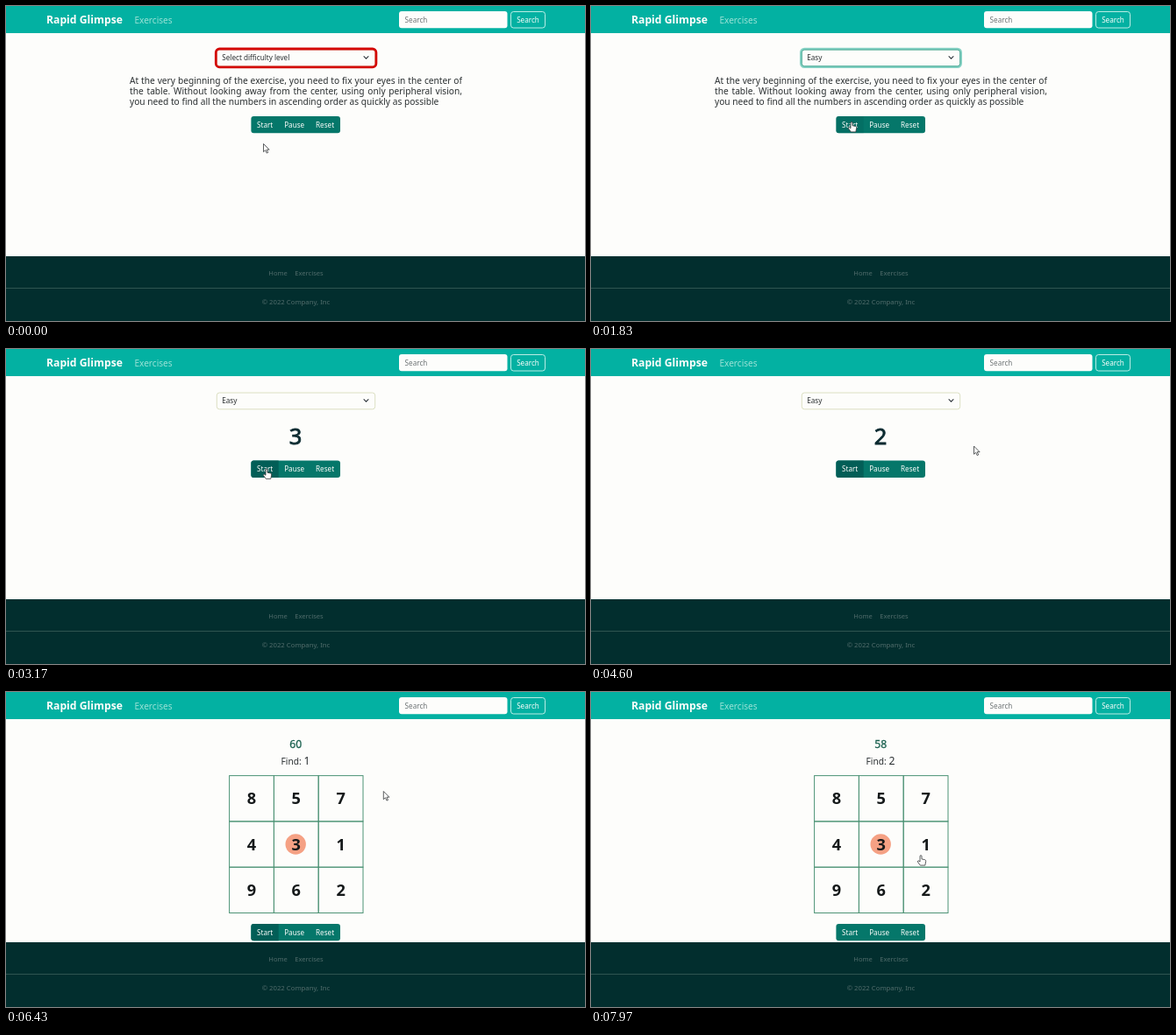
Animation of 660 by 360 pixels, one loop 8 s. Source, as an HTML page:

```html
<!DOCTYPE html>
<html lang="en">
<head>
<meta charset="utf-8">
<title>Number table exercise</title>
<style>
  html, body { margin: 0; width: 100%; height: 100%; overflow: hidden; background: #fdfdfb; }
  svg { display: block; width: 660px; height: 360px; font: 8.15px "Noto Sans", sans-serif; fill: #2a2f31; }
  p { margin: 0; font-size: 10.18px; line-height: 12.22px; text-align: justify; color: #2a2f31; }
  .mid { text-anchor: middle; }
  .light { fill: #fdfdfb; }
  .brand { font-size: 12.2px; font-weight: 600; }
  .nav { font-size: 10.05px; fill: #9be2d6; }
  .foot { font-size: 7.6px; fill: #526d6c; }
  .count { font-size: 25.5px; fill: #0c2b31; stroke: #0c2b31; stroke-width: .8; }
  .timer { font-size: 12.2px; fill: #1c6250; stroke: #1c6250; stroke-width: .3; }
  .find { font-size: 10.18px; }
  .digit { font-size: 12.2px; }
  .cell { font-size: 18.2px; font-weight: 700; fill: #15191a; }
  .line { fill: none; stroke: #4d9375; }
</style>
</head>
<body>
<svg viewBox="0 0 660 360">
  <rect width="660" height="360" fill="#fdfdfb"/>

  <!-- header -->
  <rect width="660" height="31" fill="#03b1a2"/>
  <text class="brand light" x="46" y="20.4">Rapid Glimpse</text>
  <text class="nav" x="146.5" y="19.6">Exercises</text>
  <rect x="448" y="6" width="123.5" height="19.2" rx="3" fill="#fdfdfb"/>
  <text x="454.6" y="19" fill="#6d7375">Search</text>
  <rect x="575.5" y="6.5" width="39" height="18.5" rx="3" fill="none" stroke="#e9fbf6" stroke-width=".8"/>
  <text class="mid light" x="595" y="19">Search</text>

  <!-- footer -->
  <rect y="286" width="660" height="74" fill="#022e2e"/>
  <path d="M0 322.5H660" stroke="#2f5550"/>
  <text class="foot" x="299.3" y="307.6">Home</text>
  <text class="foot" x="329.2" y="307.6">Exercises</text>
  <text class="foot mid" x="330.5" y="340.6" style="font-size:7.74px">© 2022 Company, Inc</text>

  <!-- instructions and countdown -->
  <foreignObject data-on="0 2900" x="141" y="78.7" width="379" height="40">
    <p>At the very beginning of the exercise, you need to fix your eyes in the center of the table. Without looking away from the center, using only peripheral vision, you need to find all the numbers in ascending order as quickly as possible</p>
  </foreignObject>
  <g class="count mid">
    <text data-on="2900 3900" x="330" y="108.6">3</text>
    <text data-on="3900 4900" x="330" y="108.6">2</text>
    <text data-on="4900 5900" x="330" y="108.6">1</text>
  </g>

  <!-- level select -->
  <g data-on="0 5900">
    <rect x="240.3" y="50" width="180.4" height="18.8" rx="3" fill="#fdfdfb" stroke="#d3d9b4" stroke-width=".8"/>
    <path d="M408 57.6l2.5 2.6 2.5-2.6" fill="none" stroke="#343a40" stroke-width="1.1" stroke-linecap="round"/>
  </g>
  <rect data-on="0 1350" x="239.3" y="49" width="182.6" height="20.8" rx="4" fill="none" stroke="#d40806" stroke-width="2.8"/>
  <g data-on="1350 2000" fill="none">
    <rect x="239.2" y="49" width="182.6" height="20.8" rx="4" stroke="#86d2c4" stroke-width="2.4"/>
    <rect x="240.3" y="50" width="180.4" height="18.8" rx="3" stroke="#45a897" stroke-width=".9"/>
  </g>
  <text data-on="0 1350" x="246.3" y="62">Select difficulty level</text>
  <text data-on="1350 5900" x="246.3" y="62">Easy</text>

  <!-- number table -->
  <g data-on="5900 8000">
    <circle cx="330.2" cy="174" r="11.7" fill="#f5a184"/>
    <g id="board"></g>
    <g class="timer mid">
      <text data-on="5900 6900" x="330.3" y="64">60</text>
      <text data-on="6900 7900" x="330.3" y="64">59</text>
      <text data-on="7900 8000" x="330.3" y="64">58</text>
    </g>
    <text class="find" x="313.6" y="82.7">Find:</text>
    <text class="digit" data-on="5900 7850" x="339.6" y="82.7">1</text>
    <text class="digit" data-on="7850 8000" x="339.6" y="82.7">2</text>
  </g>

  <g id="buttons">
    <rect x="279.4" y="126" width="101.6" height="19.3" rx="3" fill="#05776a"/>
    <path id="startShade" d="M310.7 126H282.4a3 3 0 0 0-3 3v13.3a3 3 0 0 0 3 3H310.7z" fill="#025e57"/>
    <g class="mid light">
      <text x="295.2" y="138.6">Start</text>
      <text x="328.7" y="138.6">Pause</text>
      <text x="363.6" y="138.6">Reset</text>
    </g>
  </g>

  <!-- open list -->
  <g data-on="800 1350">
    <rect x="239.8" y="68.5" width="181" height="48.2" fill="#fdfdfb" stroke="#7c8078" stroke-width=".9"/>
    <rect id="highlight" x="240.2" y="69" width="180.2" height="12" fill="#1b87ec"/>
    <g id="options"></g>
  </g>

  <g id="cursor" stroke-linejoin="round">
    <path id="arrow" d="M0 0V9.2L2.2 7.3 3.7 10.6 5.2 9.9 3.7 6.7H6.6Z" fill="#fdfdfb" stroke="#34383a" stroke-width=".8"/>
    <path id="hand" d="M-1 .8Q0-.6 1 .8V4.4L4.6 5.2Q6 5.6 5.7 7.2L4.8 11.6H-.7L-3.6 7.6Q-3.6 6-2.3 6.4L-1 7.5Z" fill="#fdfdfb" stroke="#34383a" stroke-width=".8"/>
  </g>
</svg>
<script>
  const LOOP = 8000;
  const byId = id => document.getElementById(id);
  const show = (el, on) => { el.style.display = on ? '' : 'none'; };
  const within = (t, from, to) => t >= from && t < to;

  function add(parent, tag, attrs, text = '') {
    const el = document.createElementNS('http://www.w3.org/2000/svg', tag);
    for (const key in attrs) el.setAttribute(key, attrs[key]);
    el.textContent = text;
    parent.append(el);
    return el;
  }

  const CELL_W = 50.8, CELL_H = 52.3;
  [...'857431962'].forEach((digit, i) => {
    const x = 254.6 + i % 3 * CELL_W, y = 95.6 + Math.floor(i / 3) * CELL_H;
    add(byId('board'), 'rect', { class: 'line', x, y, width: CELL_W, height: CELL_H });
    add(byId('board'), 'text', { class: 'cell mid', x: x + CELL_W / 2, y: y + 32.8 }, digit);
  });

  const options = ['Select difficulty level', 'Easy', 'Normal', 'Hard'].map((label, i) =>
    add(byId('options'), 'text', { x: 246.8, y: 78 + i * 11.7 }, label));

  const switches = [...document.querySelectorAll('[data-on]')].map(el =>
    [el, ...el.dataset.on.split(' ').map(Number)]);

  // Pointer stops: time, x, y
  const path = [
    [0, 293.5, 157.5], [150, 293.5, 157.5], [720, 289, 69], [920, 289, 69],
    [1220, 264, 86], [1380, 264, 86], [1700, 297, 132.3], [2000, 297, 132.3],
    [2500, 297, 136.8], [3300, 297, 136.8],
    [4200, 436.5, 111], [5600, 436.5, 111], [6200, 430.3, 113.5], [6900, 430.3, 113.5],
    [7650, 376, 186.5], [LOOP, 376, 186.5]
  ];

  function pointerAt(t) {
    const i = path.findIndex(stop => stop[0] > t);
    const [t0, x0, y0] = path[i - 1], [t1, x1, y1] = path[i];
    const u = (t - t0) / (t1 - t0), k = u * u * (3 - 2 * u);
    return [x0 + (x1 - x0) * k, y0 + (y1 - y0) * k];
  }

  function draw(now) {
    const t = now % LOOP;
    for (const [el, from, to] of switches) show(el, within(t, from, to));

    const chosen = t < 1080 ? 0 : 1;
    byId('highlight').setAttribute('y', 69 + chosen * 11.7);
    options.forEach((el, i) => el.setAttribute('class', i === chosen ? 'light' : ''));

    const drop = t < 2900 ? 0 : t < 5900 ? 1.6 : 139;
    byId('buttons').setAttribute('transform', `translate(0 ${drop})`);
    show(byId('startShade'), within(t, 1650, 7850));
    byId('startShade').setAttribute('opacity', t < 1900 ? .3 : 1);

    const [x, y] = pointerAt(t);
    const pointing = within(t, 1650, 3450) || t >= 7400;
    byId('cursor').setAttribute('transform', `translate(${x} ${y})`);
    show(byId('hand'), pointing);
    show(byId('arrow'), !pointing);
  }

  const start = performance.now();
  function tick() {
    draw(performance.now() - start);
    requestAnimationFrame(tick);
  }
  tick();
</script>
</body>
</html>
```
